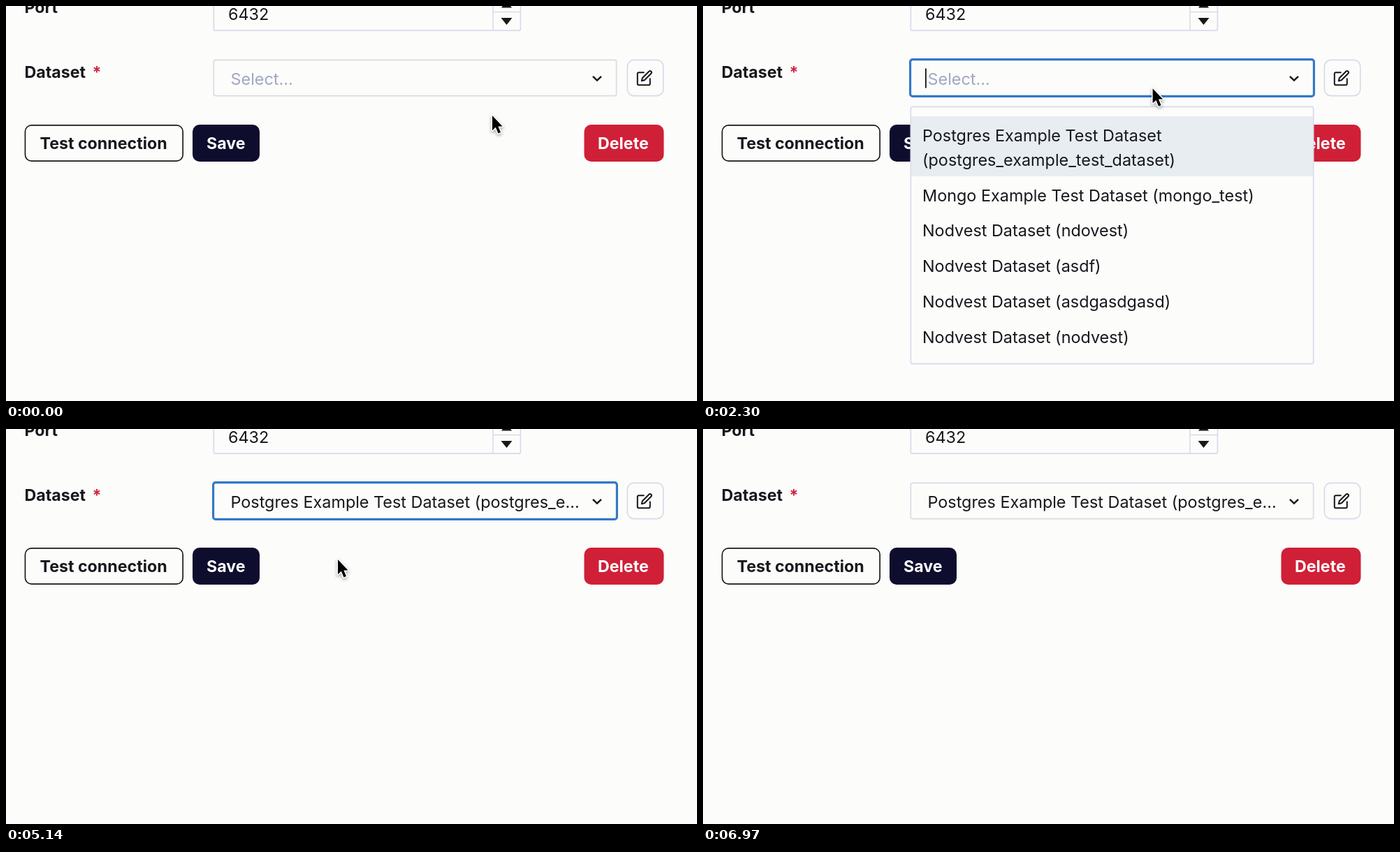
An HTML page with a canvas that plays this animation: 989 by 566 pixels, repeating every 7000 ms.

```html
<!DOCTYPE html>
<html lang="en">
<head>
<meta charset="utf-8">
<title>Dataset form</title>
<style>
html, body { margin: 0; width: 100%; height: 100%; overflow: hidden; background: #fcfcfb; }
canvas { display: block; width: 989px; height: 566px; }
</style>
</head>
<body>
<canvas id="stage" width="989" height="566"></canvas>
<script>
const ctx = document.getElementById('stage').getContext('2d');
const LOOP = 7000, BG = '#fcfcfb', INK = '#17181c', LINE = '#d8dae9';
const REGULAR = '400 23.4px Inter, sans-serif', BOLD = '700 23.2px Inter, sans-serif';

const OPTIONS = [
  ['Postgres Example Test Dataset', 193.5],
  ['(postgres_example_test_dataset)', 228.5],
  ['Mongo Example Test Dataset (mongo_test)', 279.5],
  ['Nodvest Dataset (ndovest)', 330],
  ['Nodvest Dataset (asdf)', 380.5],
  ['Nodvest Dataset (asdgasdgasd)', 431.5],
  ['Nodvest Dataset (nodvest)', 483]
];

// Times of the interface events, ms
const OPEN = 1940, PRESS = 3970, PICK = 4220, BLUR = 6620, LEAVE = 6860;
const CLICKS = [[1965, 2240], [3970, 4330], [6560, 6850]];

const HAND = new Path2D('M1 4Q1 1.5 3.2 1.5Q5.4 1.5 5.4 4L5.4 11Q6 10 8 10.2Q9.6 10.5 9.8 12' +
  'Q11 11 12.8 11.6Q14 12 14.2 13.6Q15.5 12.8 17 13.6Q18.5 14.3 18.3 17Q18.2 21 16.5 23.5' +
  'L16 28L6 28L5.5 25.5Q2 22-.5 19Q-3 16-5 14Q-6 12-4 11.3Q-2 11 1 14.5Z');
const ARROW = new Path2D('M0 0V21.2L4.8 16.8L8.5 25.6L12 24.1L8.4 15.4H14.6Z');
const PEN = new Path2D('M11 4H4a2 2 0 0 0-2 2v14a2 2 0 0 0 2 2h14a2 2 0 0 0 2-2v-7' +
  'M18.5 2.5a2.1 2.1 0 0 1 3 3L12 15l-4 1 1-4Z');

const ramp = (t, a, b) => Math.min(1, Math.max(0, (t - a) / (b - a)));
const inOut = u => u < .5 ? 4 * u ** 3 : 1 - (2 - 2 * u) ** 3 / 2;
const lerp = (a, b, u) => a + (b - a) * u;
const mix = (a, b, u) => `rgb(${a.map((v, i) => Math.round(lerp(v, b[i], u)))})`;

function text(str, x, y, font = REGULAR, color = INK) {
  ctx.font = font;
  ctx.fillStyle = color;
  ctx.fillText(str, x, y);
}

// Outer edges as in CSS: the border lies inside the box
function box(x, y, w, h, r, fill, stroke, width = 1.66) {
  const inset = stroke ? width / 2 : 0;
  ctx.beginPath();
  ctx.roundRect(x + inset, y + inset, w - 2 * inset, h - 2 * inset, r - inset);
  if (fill) { ctx.fillStyle = fill; ctx.fill(); }
  if (stroke) { ctx.strokeStyle = stroke; ctx.lineWidth = width; ctx.stroke(); }
}

function poly(points, fill, stroke, width) {
  ctx.beginPath();
  points.forEach(([x, y]) => ctx.lineTo(x, y));
  if (fill) { ctx.fillStyle = fill; ctx.fill(); }
  if (stroke) { ctx.strokeStyle = stroke; ctx.lineWidth = width; ctx.stroke(); }
}

function pointer(t) {
  if (t < OPEN) {
    const u = inOut(ramp(t, 500, 1480));
    return [lerp(696, 688, u), lerp(157, 115, u)];
  }
  if (t < 5000) {
    const u = 1 - (1 - ramp(t, 2140, 3600)) ** 2;
    return [lerp(688, 475, u), lerp(115, 187, u * u)];
  }
  const u = inOut(ramp(t, 5240, 6170));
  return [lerp(475, 345, u), lerp(187, 190, u)];
}

function drawPort() {
  text('Port', 26.5, 10, BOLD);
  box(296.5, -20, 440.8, 56, 3.3, null, LINE);
  text('6432', 318, 19.5);
  poly([[697, 0], [697, 35]], null, LINE, 1.5);
  poly([[697, 8.5], [737, 8.5]], null, LINE, 1.5);
  poly([[709, 2.5], [716.5, -8], [724, 2.5]], INK);
  poly([[708.5, 17], [724.5, 17], [716.5, 27]], INK);
}

function drawSelect(t, y) {
  text('Dataset', 26.5, 103, BOLD);
  text('*', 123.5, 103, BOLD, '#d02545');
  const hover = t < 5000 ? ramp(y, 131, 125) || +(t >= OPEN) : 0;
  const focus = ramp(t, OPEN + 10, OPEN + 210) * (1 - ramp(t, BLUR, BLUR + 200));
  const grey = [lerp(218, 193, hover), lerp(219, 197, hover), lerp(228, 216, hover)];
  const grow = focus * 1.5;
  box(296.5 - grow, 76.6 - grow, 578 + 2 * grow, 52.8 + 2 * grow, 3.5 + grow, BG,
    mix(grey, [50, 121, 199], focus), 1.66 + 1.5 * focus);
  if (t < PICK) {
    text('Select...', 321.5, 112.5, REGULAR, '#a1a6c3');
    const caret = (t >= OPEN && t < 2500) || (t >= 3060 && t < 3600) || t >= 4000;
    if (caret) {
      ctx.fillStyle = '#111';
      ctx.fillRect(318, 89.5, 1.8, 28);
    }
  } else {
    text('Postgres Example Test Dataset (postgres_e\u2026', 321.5, 112.5);
  }
  poly([[840, 100.8], [846, 106.6], [852, 100.8]], null, INK, 2.5);
  box(888.6, 76.6, 53, 52.8, 9.9, null, LINE);
  ctx.save();
  ctx.translate(901.8, 91.2);
  ctx.strokeStyle = INK;
  ctx.lineWidth = 2;
  ctx.lineJoin = ctx.lineCap = 'round';
  ctx.stroke(PEN);
  ctx.restore();
}

function drawButtons(t, x) {
  const over = t > 5240 ? ramp(x, 363, 354) * (1 - ramp(t, LEAVE, LEAVE + 90)) : 0;
  box(26.6, 170, 227.4, 53, 10, BG, INK);
  text('Test connection', 48.5, 205, BOLD);
  box(267, 170, 96, 53, 10, mix([14, 13, 46], [59, 58, 112], over));
  text('Save', 287, 205, BOLD, '#fff');
  box(827.5, 170, 114, 53, 10, '#cf2037');
  text('Delete', 847, 205, BOLD, '#fff');
}

function drawMenu(t) {
  if (t < OPEN || t >= PICK) return;
  box(296.5, 143.5, 578, 370, 3.5, BG, LINE);
  const press = ramp(t, PRESS, PRESS + 60);
  ctx.fillStyle = mix([232, 237, 241], [223, 229, 236], press);
  ctx.fillRect(298, 158, 575, 86);
  OPTIONS.forEach(([label, y]) => text(label, 314, y));
}

function drawPointer(t, x, y) {
  if (t >= LEAVE) return;
  for (const [a, b] of CLICKS) {
    if (t < a || t > b) continue;
    const u = ramp(t, a, a + 120);
    ctx.globalAlpha = lerp(.13, .5, u) * (1 - ramp(t, b - 130, b));
    ctx.fillStyle = '#eee07a';
    ctx.beginPath();
    ctx.arc(x + 1.5, y + 2.5, lerp(12, 31, u), 0, 7);
    ctx.fill();
    ctx.globalAlpha = 1;
  }
  const onMenu = t >= OPEN && t < PICK && y > 157;
  const onSave = t > 5240 && x < 363;
  ctx.save();
  ctx.translate(x, y);
  ctx.lineJoin = 'round';
  ctx.shadowColor = 'rgba(0,0,0,.35)';
  ctx.shadowBlur = 4;
  ctx.shadowOffsetY = 2;
  if (onMenu || onSave) {
    ctx.fillStyle = '#fff';
    ctx.fill(HAND);
    ctx.shadowColor = 'transparent';
    ctx.strokeStyle = '#000';
    ctx.lineWidth = 1.7;
    ctx.stroke(HAND);
    for (const fx of [7, 10.5, 14]) poly([[fx, 18], [fx, 24]], null, '#000', 1.5);
  } else {
    ctx.strokeStyle = '#fff';
    ctx.lineWidth = 3;
    ctx.stroke(ARROW);
    ctx.shadowColor = 'transparent';
    ctx.fillStyle = '#000';
    ctx.fill(ARROW);
  }
  ctx.restore();
}

function draw(t) {
  const [x, y] = pointer(t);
  ctx.fillStyle = BG;
  ctx.fillRect(0, 0, 989, 566);
  drawPort();
  drawSelect(t, y);
  drawButtons(t, x);
  drawMenu(t);
  drawPointer(t, x, y);
}

const start = performance.now();
function tick() {
  draw((performance.now() - start) % LOOP);
  requestAnimationFrame(tick);
}
tick();
</script>
</body>
</html>
```
